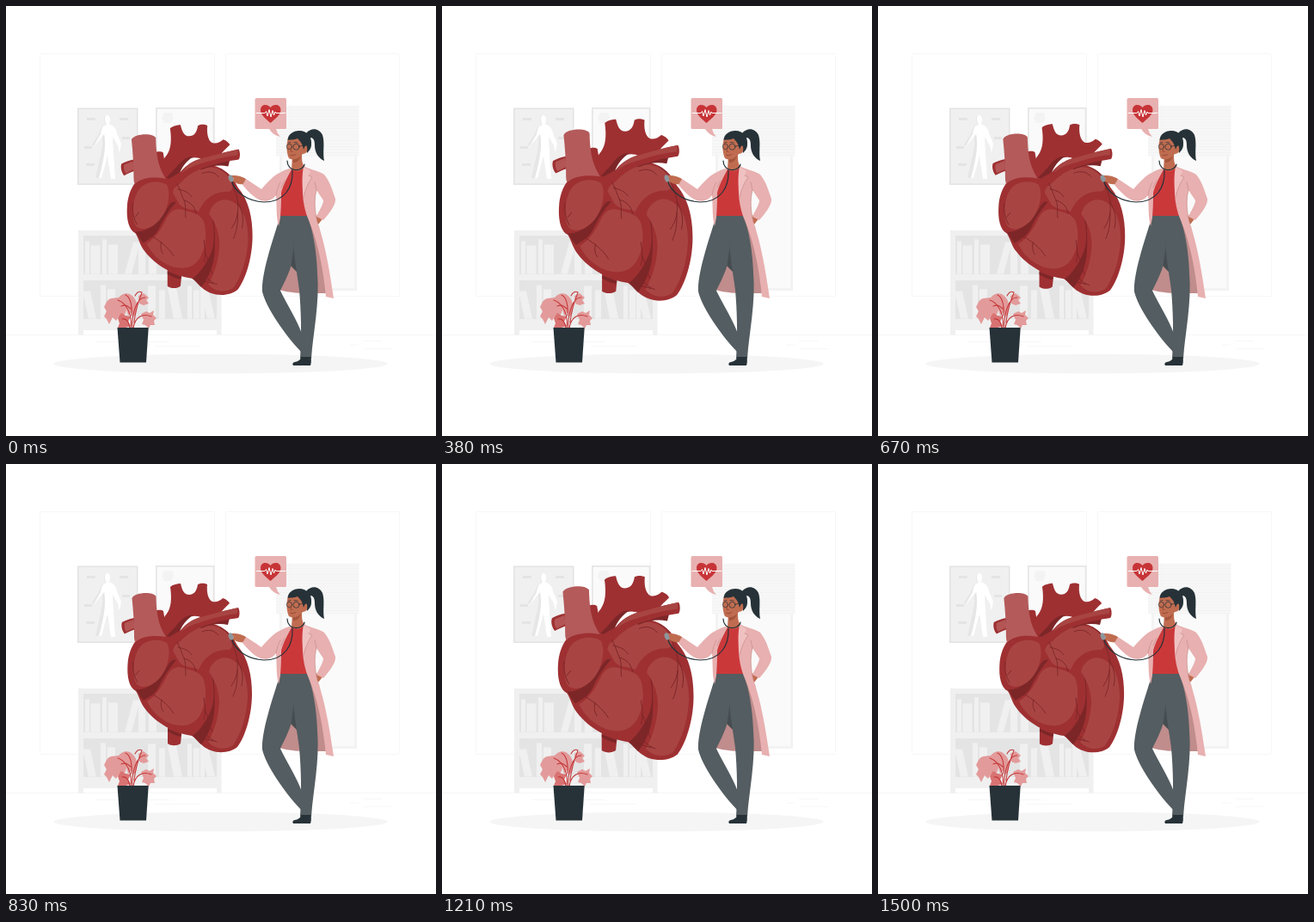
Write an HTML page that moves like this. It is 500 px wide and 500 px high and loops after 1.54 s.

```html
<!DOCTYPE html>
<html lang="en">
<head>
<meta charset="utf-8">
<title>Heart check-up</title>
<style>
html, body { margin: 0; width: 100%; height: 100%; overflow: hidden; background: #fff; }
svg { display: block; width: 100vw; height: 100vh; }
.line { fill: none; stroke-linecap: round; stroke-linejoin: round; }
</style>
</head>
<body>
<svg viewBox="0 0 500 500">
  <!-- room -->
  <g fill="none" stroke="#f5f5f5" stroke-width=".8">
    <rect x="39.500" y="55.500" width="203" height="282" rx="1"/>
    <rect x="255.500" y="55.500" width="202" height="282" rx="1"/>
    <path stroke="#f0f0f0" stroke-width=".6" d="M0 382.500H500"/>
    <path d="M105 390.500H190M173 395.500H225M415 389.500H437M417 398.500H449M400 394H410"/>
  </g>
  <ellipse cx="249.500" cy="416" rx="194" ry="11.300" fill="#f5f5f5"/>

  <!-- window with blinds -->
  <rect x="318" y="118" width="90" height="213" fill="#f3f3f3"/>
  <rect x="321" y="120" width="84" height="208" fill="#fafafa"/>
  <g id="blinds"></g>

  <!-- posters -->
  <rect x="83" y="118.500" width="70.500" height="89.500" fill="#e3e3e3"/>
  <rect x="84.500" y="120" width="67.500" height="86.500" fill="#f0f0f0"/>
  <path fill="#e4e4e4" d="M94 130h10v3h-10zM132 130h10v3h-10zM91 163h9v3h-9zM135 152h9v3h-9zM93 183h10v3h-10zM134 183h9v3h-9z"/>
  <path fill="#e6e6e6" d="M117 127C113 128 114 134 116 138C111 139 110 143 108 149L100 161L102 163L112 151C113 158 112 166 109 178L104 200H110L117 174Z"/>
  <path fill="#fff" d="M117 127C122 127 122 135 119.500 137C124 139 128 141 129 148L134 160L132 171L130 162L124 152C124 160 125 165 125 172L127 201H122L118 174L111 200H108C112 186 114 176 115 164C115 157 115 152 114 149L105 160L101 165L110 149C111 143 112 139 117 138C115 135 114 128 117 127Z"/>
  <rect x="174" y="118" width="68.500" height="89" fill="#e6e6e6"/>
  <rect x="175.700" y="119.700" width="65" height="86" fill="#fafafa"/>
  <path fill="#f3f3f3" d="M184 124H193L195 130L192 136H184L181 130Z"/>

  <!-- shelf -->
  <path fill="#f0f0f0" d="M84 261H250.500V382.500H245V377H90V382.500H84Z"/>
  <path fill="#e4e4e4" d="M90 267H245V312H90ZM90 319H245V364H90Z"/>
  <g id="books" fill="#f0f0f0"></g>

  <!-- plant -->
  <g fill="#e39a9a">
    <path d="M117 344C121 338 128 340 131 339C136 341 141 346 140 353C139 360 134 363 131 361L128 366L124 362L120 370L117 364L114 361L117 355L114 350Z"/>
    <path d="M130 341C133 335 139 333 144 335C149 338 152 343 152 348C153 354 151 358 149 361L146 356L142 360L140 352Z"/>
    <path d="M154 337L160 334L166 339L163 342L166 346L160 348L155 346Z"/>
    <path d="M157 358L163 355L167 357L172 354L171 359L175 363L172 366L173 371L168 371L166 375L162 371L158 370L160 365Z"/>
  </g>
  <path fill="#d97373" d="M130 363L134 357L139 360L145 361L142 367L145 372L139 374L138 380L134 376L130 374L132 369Z"/>
  <g class="line" stroke="#c4393b" stroke-width="1.100">
    <path d="M145 375C147 362 142 346 130 342M147 375C146 356 153 338 162 339M148 375C150 361 159 357 169 361M144 375C143 367 140 363 135 364M146 360C147 347 144 338 139 336M149 368C151 347 158 335 158 333C155 331 152 333 150 337M145 352C139 346 137 348 134 349"/>
  </g>
  <path fill="#263238" d="M129.500 374H165.700L163 414.500H132.500Z"/>

  <!-- heart -->
  <g id="heart">
    <path fill="#9e3032" d="M149 179C143 180 139 182 135 184C133.500 188 135 194 138 197.500C143 195 147 193 151 192L176 205L187 195L183 171C180 169 176 170 173 171Z"/>
    <path fill="#b35555" d="M148 181L138 185C137 189 138 193 140 195L150 190Z"/>
    <path fill="#9e3032" d="M188 306V325C192 328 199 328 203 325L205 306Z"/>
    <path fill="#7d2628" d="M188 308L204 314L203 317C197 316 192 313 188 311Z"/>
    <path fill="#9e3032" d="M178 204C177 193 181 181 187 174C192 167 193 157 191 143C194 140 200 139 203 139C205 147 207 152 213 152C219 152 222 147 223 140C227 138 231 138.500 234 140C233 149 235 158 240 160C245 161 249 159 252 156C256 157 259 160 260 162C255 167 250 171 247 177L228 179C221 175 210 176 204 186L198 207Z"/>
    <path fill="#7d2628" d="M181 207C187 199 193 194 198 188C205 179 212 175 217 176C207 183 203 191 201 198L197 212Z"/>
    <path fill="#9e3032" d="M150 207C160 197 178 198 190 201C205 192 213 187 232 185C251 185 263 198 269 211C282 226 286 247 286 267C286 294 277 319 269 329C258 338 239 337 228 327C223 323 220 318 216 316C196 313 174 301 162 285C156 278 155 270 151 264C143 260 140.500 247 141.500 233C142 222 146 212 150 207Z"/>
    <path fill="#7d2628" d="M151 262C163 264 178 251 186 238C190 231 193 226 198 228C190 237 183 248 179 257C174 268 167 270 160 275C156 271 154 267 151 262Z"/>
    <path fill="#7d2628" d="M238 239C243 260 243 278 237 289C231 302 224 311 217 316L227 326C234 317 240 305 242 290C244 270 242 252 240 239Z"/>
    <g fill="#a84543">
      <path d="M154 215C161 204 177 202 187 208C192 216 189 232 184 241C177 255 161 264 152 256C146 247 148 225 154 215Z"/>
      <path d="M194 217C200 197 221 188 235 188C248 188 256 194 261 203C264 209 264 214 259 216C240 215 229 227 224 239C216 235 210 238 202 231Z"/>
      <path d="M164 276C174 270 181 259 186 249C190 239 197 234 206 237C213 240 224 240 229 249C234 260 233 281 225 293C217 305 205 306 192 302C179 297 169 287 164 276Z"/>
      <path d="M236 242C238 231 249 223 259 226C275 231 281 250 281 271C280 294 273 314 264 327C255 333 243 332 235 323C242 311 247 296 248 277C248 262 242 250 236 242Z"/>
    </g>
    <path fill="#7d2628" d="M224 188C237 182 250 180 260 179L258 187C248 185 239 186 227 191Z"/>
    <path fill="#9e3032" d="M193 214C198 197 207 184 226 178C242 174 255 170 270 167C272 170 272 177 270 179C258 181 250 182 242 185C226 189 214 194 203 206Z"/>
    <path fill="#a84543" d="M204 195C209 186 216 181 227 178C242 174 255 170 269 167.500L269 174C252 176 238 180 226 184C216 187 210 190 204 195Z"/>
    <path fill="#b45a5a" d="M146.500 156C150 149 171 148 174.500 154C175 177 178 188 186 201C174 199 160 199 150 207C149 204 149 201 149 198C149 184 148 171 146.500 156Z"/>
    <g class="line" stroke="#7d2628" stroke-width=".9">
      <path d="M199 207C203 214 204 220 207 226C214 228 219 232 221 241M207 226C210 233 208 239 209 246M200 213C207 215 212 216 216 222"/>
      <path d="M261 202C263 211 268 217 269 228C270 242 268 249 262 258M269 228C273 236 277 244 274 258M269 240C269 254 268 261 264 270M249 190C256 194 262 198 265 206M228 195C235 192 242 193 247 199"/>
      <path d="M171 268C179 273 188 279 195 290M181 274C179 281 181 285 183 288M230 272C231 281 233 287 230 297M231 286C236 295 235 302 240 311M233 315C237 319 241 322 245 323M226 318L241 322"/>
      <path d="M148 230C147 239 149 247 153 254M151 245L155 240"/>
    </g>
  </g>

  <!-- speech bubble -->
  <path fill="#e8b0b0" d="M291.500 107H324.500Q326 107 326 108.500V141.500Q326 143 324.500 143H314Q315 148 319 152Q310 150 306 143H291Q289.500 143 289.500 141.500V108.500Q289.500 107 291.500 107Z"/>
  <path fill="#c73437" d="M307.500 136C303 132 296 127 296 121C296 114 304 113.500 307.500 118C311 113.500 319.500 114 319.500 121C319.500 127 312 132 307.500 136Z"/>
  <path class="line" stroke="#fff" stroke-width="1" d="M291 124.500H301L302.500 122.500L304 128L306 120.500L308 129L310 121.500L311.500 127L313 123L314 124.500H325"/>

  <!-- doctor -->
  <path fill="#c08c8c" d="M333 296L318 330C334 335 353 334 373 334L364 256L350 243Z"/>
  <path fill="#263238" d="M349 148C355 141 364 142 368 150C371 159 368 170 370 180C363 177 359 170 359 162C359 154 356 152 351 154Z"/>
  <path fill="#454d51" d="M334 262L331 302L338 309L341 268Z"/>
  <path fill="#545d61" d="M319 244H340L335 276L331.500 302C328 314 322 324 319 331C327 348 338 364 344 381L343 402C324 382 302 350 298 332C297 311 309 276 319 244Z"/>
  <path fill="#545d61" d="M325 243H350C357 260 361 285 362 310C365 345 357 380 355 410H342C344 382 343 353 341 330C338 308 333 283 334 263Z"/>
  <path fill="#263238" d="M343 408H354.500C355 412 355 415 354 418H334C332 415 335 414 338 413.500C341 412 343 411 343 408Z"/>
  <path fill="#cb383a" d="M326 191C333 187 341 188 346 188L350 244H319L320 211Z"/>
  <path fill="#c06c50" d="M333 174L344 171C344 178 344 183 347 187C344 192 337 193 332 190Z"/>
  <path fill="#a4553c" d="M333 177C337 178 340 177 343 173C342 180 338 182 334 182Z"/>
  <path fill="#c06c50" d="M328 154C325 163 327 173 329 177C333 180 341 178 345 172C350 172 353 166 350 162C349 154 342 150 335 150Z"/>
  <path fill="#263238" d="M327.500 156C328 149 334 145 341 145C350 145 356 152 355 161C355 166 352 169 350 171C350 167 351 164 349 162C347 163 347 165 346 167C345 161 343 158 339 154C335 156 331 155 327.500 156Z"/>
  <g class="line" stroke="#263238" stroke-width=".7">
    <circle cx="329.500" cy="163.500" r="3.100"/>
    <circle cx="337.500" cy="163.800" r="3.500"/>
    <path d="M341 163L349 162M328.500 159L331 158.500M335 158.500L339 159"/>
  </g>
  <path class="line" stroke="#8f4430" stroke-width=".8" d="M332 164L331 169L333 169.500M331 173.500Q334 174.500 337 172.500"/>
  <path fill="#c06c50" d="M279 201C274 198 268 196.500 263 197C261 198 263 200 265 201C262 202 263 204 266 205C270 208 275 207 279 208Z"/>
  <path fill="#e8b0b0" d="M279 201L297 213C304 205 312 196 320 193C325 190 330 189 333 188C328 198 323 206 320 217L319 246L317 256C314 245 315 233 314 220C310 226 303 228 296 226C288 223 280 214 275 208Z"/>
  <path class="line" stroke="#c88c8c" stroke-width=".7" d="M314 220C315 214 317 209 319 205M320 211L324 203"/>
  <path fill="#c06c50" d="M364 242C360 244 357 248 357 251C361 251 361 254 363 254L370 245Z"/>
  <path fill="#e8b0b0" d="M346 186C352 190 363 191 370 196C377 204 380 216 383 224C384 232 374 243 369 249L361 245C364 238 369 231 369 226L361 214C358 225 359 239 362 251C371 276 376 306 381 340L372 338C369 307 363 275 352 249C348 240 344 225 345 208Z"/>
  <path fill="#f0c1c1" d="M346 187L354 192L352 197L356 199C351 206 348 214 346 222C344 209 344 197 346 187Z"/>
  <path class="line" stroke="#c88c8c" stroke-width=".7" d="M361 214L359 205M361 214C358 225 359 239 362 251M352 197L356 199C351 206 348 214 346 222"/>

  <!-- stethoscope -->
  <g class="line" stroke="#263238" stroke-width="1.200">
    <path d="M327 180C327 186 331 190 336 190.500C341 191 347 188 347 184M333 191C334 211 324 228 300 228C281 227 266 217 262 202"/>
  </g>
  <ellipse cx="261.500" cy="200.500" rx="2.700" ry="4.200" transform="rotate(-18 261.500 200.500)" fill="#8c979c"/>
  <path class="line" stroke="#c06c50" stroke-width="2" d="M264.500 198.500L269 201.500"/>
</svg>
<script>
const $ = id => document.getElementById(id);

// Slats
let slats = '<path fill="#f7f7f7" d="M314 115.500H410.500V174H314Z"/><path stroke="#f1f1f1" stroke-width=".7" d="';
for (let y = 118; y <= 174; y += 3.5) slats += `M314 ${y}H410.500`;
$('blinds').innerHTML = slats + '"/>';

// Books: x, width, height, lean
const rows = [
  [311.5, [[92, 5, 38, 0], [98.5, 11, 33, 0], [112, 5, 40, 0], [119, 11, 34, 0], [138, 8, 37, 10], [154, 8, 39, 0], [166, 9, 35, 0], [198, 8, 38, 0], [213, 9, 35, 8]]],
  [363.5, [[96, 9, 32, -7], [110, 6, 39, 0], [118, 9, 34, 0], [165, 9, 38, 0], [178, 7, 33, 0], [195, 10, 36, -7], [211, 5, 38, 0], [218, 7, 33, 0], [234, 9, 34, -8], [226, 5, 38, 0]]]
];
$('books').innerHTML = rows.map(([base, list]) => list.map(([x, w, h, lean]) =>
  `<path d="M${x} ${base}l${lean} ${-h}h${w}l${-lean} ${h}z"/>`).join('')).join('');

// Cubic Bezier easing, solved by bisection
function bezier(x1, y1, x2, y2) {
  const at = (a, b, u) => 3 * a * u * (1 - u) ** 2 + 3 * b * u * u * (1 - u) + u ** 3;
  return x => {
    let lo = 0, hi = 1;
    for (let i = 0; i < 24; i++) {
      const mid = (lo + hi) / 2;
      if (at(x1, x2, mid) < x) lo = mid; else hi = mid;
    }
    return at(y1, y2, lo);
  };
}
const swell = bezier(.42, 0, .58, 1);
const relax = bezier(.25, .1, .25, 1);

const LOOP = 1540, BEAT = 714, START = 134, RISE = 351;
const CX = 213.5, CY = 236, GROW = .092;

function beat(t) {
  const p = (t - START + BEAT) % BEAT;
  return p < RISE ? swell(p / RISE) : 1 - relax((p - RISE) / (BEAT - RISE));
}

function draw(t) {
  const s = 1 + GROW * beat(t);
  $('heart').setAttribute('transform', `translate(${CX} ${CY}) scale(${s}) translate(${-CX} ${-CY})`);
}

const t0 = performance.now();
function tick() {
  draw((performance.now() - t0) % LOOP);
  requestAnimationFrame(tick);
}
tick();
</script>
</body>
</html>
```
